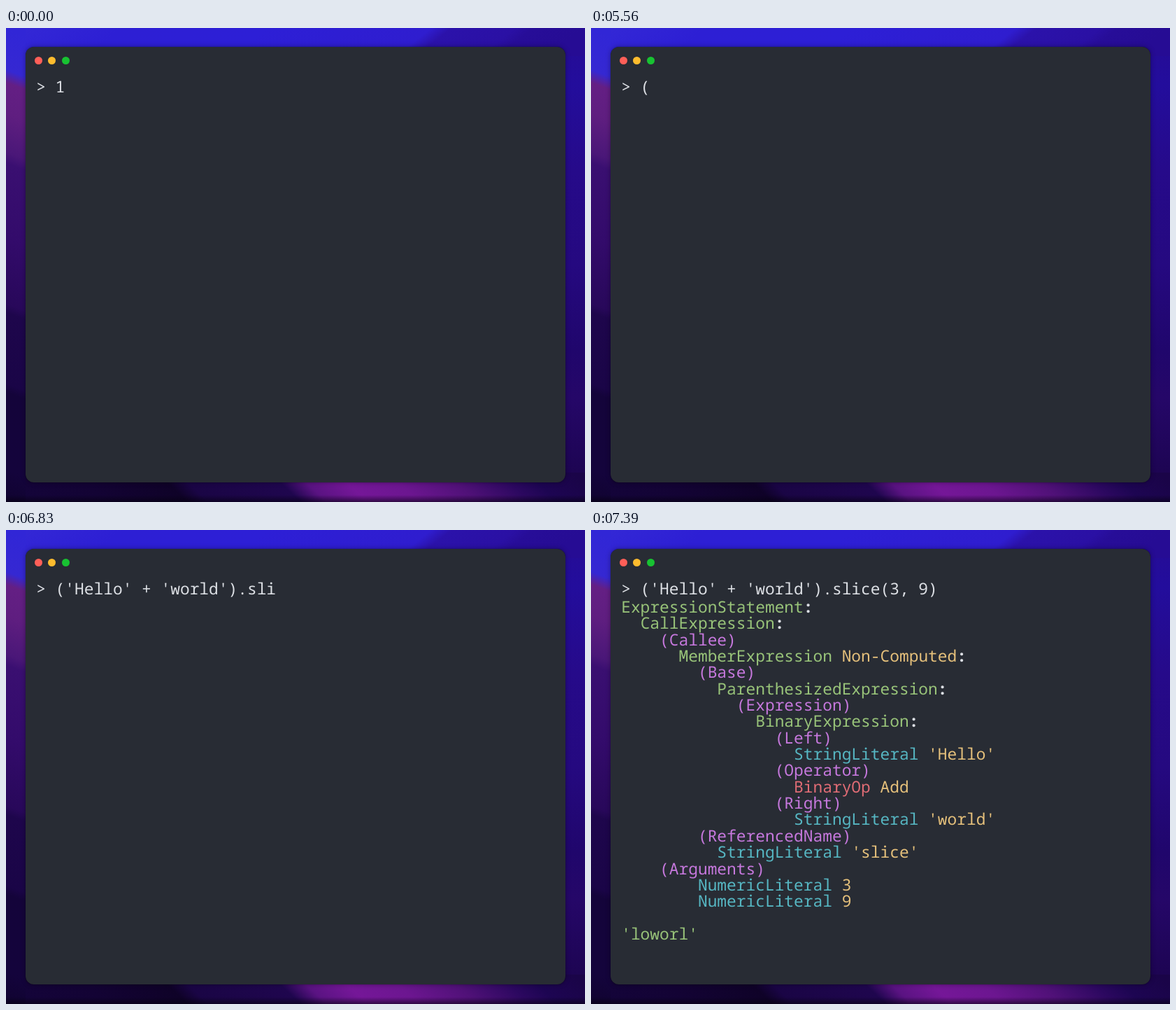
Write an HTML page that moves like this. It is 828x677 px and loops after 8000 ms.

```html
<!DOCTYPE html>
<html lang="en">
<head>
<meta charset="utf-8">
<title>Expression REPL</title>
<style>
  html, body { margin: 0; width: 100%; height: 100%; overflow: hidden; background: #14033a; }
  .stage { position: relative; width: 828px; height: 677px; overflow: hidden; }
  .stage > * { position: absolute; }
  .wall { left: 0; top: 0; }
  .window {
    left: 28px; top: 27px; width: 772px; height: 622px;
    border-radius: 12px; background: #282c34;
    box-shadow: 0 0 1px rgba(0, 0, 0, .6), 0 0 7px rgba(0, 0, 0, .35);
  }
  .dot { top: 41.2px; width: 11px; height: 11px; border-radius: 50%; }

  /* One character is 0.6em wide */
  .scene {
    left: 43.2px; top: 0;
    font: 22.87px/23.35px "Noto Sans Mono", "DejaVu Sans Mono", monospace;
    font-variant-ligatures: none;
    text-rendering: geometricPrecision;
    color: #dcdfe4;
    opacity: 0;
  }
  .scene > * { position: absolute; left: 0; margin: 0; font: inherit; white-space: pre; }
  .prompt { top: 72.4px; overflow: hidden; }
  .tree { top: 98px; }
  b { color: #dcdfe4; }
  .g { color: #98c379; }
  .p { color: #c678dd; }
  .c { color: #56b6c2; }
  .y { color: #e5c07b; }
  .r { color: #e06c75; }

  .scene, .tree { animation: 8s step-end infinite; }
  .prompt { animation: 8s linear infinite; }
  .sum { animation-name: first; }
  .call { animation-name: second; }
  .sum .prompt { animation-name: type-sum; }
  .call .prompt { animation-name: type-call; }
  .sum .tree { animation-name: print-sum; }
  .call .tree { animation-name: print-call; }

  @keyframes first { 0% { opacity: 1 } 69.49%, 100% { opacity: 0 } }
  @keyframes second { 0% { opacity: 0 } 69.49%, 100% { opacity: 1 } }
  @keyframes type-sum {
    0% { width: 1.8em; animation-timing-function: steps(8, end) }
    5.49%, 100% { width: 6.6em }
  }
  @keyframes type-call {
    0%, 69.45% { width: 1.8em; animation-timing-function: steps(30, end) }
    90.24%, 100% { width: 19.8em }
  }
  @keyframes print-sum { 0% { opacity: 0 } 7.62%, 100% { opacity: 1 } }
  @keyframes print-call { 0% { opacity: 0 } 92.37%, 100% { opacity: 1 } }
</style>
</head>
<body>
<div class="stage">
  <svg class="wall" width="828" height="677" viewBox="0 0 828 677">
    <defs>
      <linearGradient id="left" gradientUnits="userSpaceOnUse" x1="0" y1="0" x2="0" y2="677" gradientTransform="skewY(20)">
        <stop offset="0" stop-color="#3126d6"/>
        <stop offset=".088" stop-color="#3528d2"/>
        <stop offset=".115" stop-color="#641f84"/>
        <stop offset=".18" stop-color="#5f1e80"/>
        <stop offset=".262" stop-color="#4a1778"/>
        <stop offset=".285" stop-color="#3a0f71"/>
        <stop offset=".44" stop-color="#330b6b"/>
        <stop offset=".582" stop-color="#28085a"/>
        <stop offset=".6" stop-color="#1e064c"/>
        <stop offset=".75" stop-color="#1a0547"/>
        <stop offset=".768" stop-color="#14043a"/>
        <stop offset=".93" stop-color="#14043c"/>
        <stop offset="1" stop-color="#100330"/>
      </linearGradient>
      <linearGradient id="right" x1="0" y1="0" x2="0" y2="1">
        <stop offset="0" stop-color="#260c94"/>
        <stop offset=".12" stop-color="#230d9c"/>
        <stop offset=".3" stop-color="#260a8a"/>
        <stop offset=".5" stop-color="#250980"/>
        <stop offset=".68" stop-color="#20066c"/>
        <stop offset=".78" stop-color="#250768"/>
        <stop offset=".9" stop-color="#1f0558"/>
        <stop offset="1" stop-color="#1a0448"/>
      </linearGradient>
      <linearGradient id="top" gradientUnits="userSpaceOnUse" x1="0" y1="0" x2="828" y2="0" gradientTransform="skewX(-52)">
        <stop offset="0" stop-color="#3429d6"/>
        <stop offset=".2" stop-color="#2d1fd4"/>
        <stop offset=".45" stop-color="#2d1fd6"/>
        <stop offset=".735" stop-color="#2f1dcf"/>
        <stop offset=".77" stop-color="#2b12aa"/>
        <stop offset=".88" stop-color="#2a10a4"/>
        <stop offset=".91" stop-color="#270d98"/>
        <stop offset="1" stop-color="#260c94"/>
      </linearGradient>
      <linearGradient id="bottom" gradientUnits="userSpaceOnUse" x1="0" y1="0" x2="828" y2="0" gradientTransform="translate(0 650) skewX(46)">
        <stop offset="0" stop-color="#14043a"/>
        <stop offset=".14" stop-color="#130334"/>
        <stop offset=".28" stop-color="#0f0228"/>
        <stop offset=".315" stop-color="#1a0545"/>
        <stop offset=".475" stop-color="#1f064e"/>
        <stop offset=".52" stop-color="#5a1382"/>
        <stop offset=".59" stop-color="#751798"/>
        <stop offset=".68" stop-color="#6c1690"/>
        <stop offset=".78" stop-color="#501178"/>
        <stop offset=".87" stop-color="#2c0860"/>
        <stop offset=".92" stop-color="#1d0552"/>
        <stop offset="1" stop-color="#1a0448"/>
      </linearGradient>
      <linearGradient id="floor" x1="0" y1="0" x2="0" y2="1">
        <stop offset="0" stop-color="#05010f" stop-opacity="0"/>
        <stop offset="1" stop-color="#05010f" stop-opacity=".6"/>
      </linearGradient>
    </defs>
    <rect width="60" height="677" fill="url(#left)"/>
    <rect x="770" width="58" height="677" fill="url(#right)"/>
    <rect x="28" width="800" height="40" fill="url(#top)"/>
    <rect x="28" y="635" width="800" height="42" fill="url(#bottom)"/>
    <rect y="667" width="828" height="10" fill="url(#floor)"/>
  </svg>

  <div class="window"></div>
  <div class="dot" style="left:41.2px;background:#ff5f58"></div>
  <div class="dot" style="left:60.4px;background:#febc2e"></div>
  <div class="dot" style="left:79.6px;background:#18c232"></div>

  <div class="scene sum">
    <div class="prompt">&gt; 1 + 2 * 3</div>
    <pre class="tree">
<span class="g">ExpressionStatement</span><b>:</b>
  <span class="g">BinaryExpression</span><b>:</b>
    <span class="p">(Left)</span>
      <span class="c">NumericLiteral</span> <span class="y">1</span>
    <span class="p">(Operator)</span>
      <span class="r">BinaryOp</span> <span class="y">Add</span>
    <span class="p">(Right)</span>
      <span class="g">BinaryExpression</span><b>:</b>
        <span class="p">(Left)</span>
          <span class="c">NumericLiteral</span> <span class="y">2</span>
        <span class="p">(Operator)</span>
          <span class="r">BinaryOp</span> <span class="y">Multiply</span>
        <span class="p">(Right)</span>
          <span class="c">NumericLiteral</span> <span class="y">3</span>

<span class="y">7</span></pre>
  </div>

  <div class="scene call">
    <div class="prompt">&gt; ('Hello' + 'world').slice(3, 9)</div>
    <pre class="tree">
<span class="g">ExpressionStatement</span><b>:</b>
  <span class="g">CallExpression</span><b>:</b>
    <span class="p">(Callee)</span>
      <span class="g">MemberExpression</span> <span class="y">Non-Computed</span><b>:</b>
        <span class="p">(Base)</span>
          <span class="g">ParenthesizedExpression</span><b>:</b>
            <span class="p">(Expression)</span>
              <span class="g">BinaryExpression</span><b>:</b>
                <span class="p">(Left)</span>
                  <span class="c">StringLiteral</span> <span class="y">'Hello'</span>
                <span class="p">(Operator)</span>
                  <span class="r">BinaryOp</span> <span class="y">Add</span>
                <span class="p">(Right)</span>
                  <span class="c">StringLiteral</span> <span class="y">'world'</span>
        <span class="p">(ReferencedName)</span>
          <span class="c">StringLiteral</span> <span class="y">'slice'</span>
    <span class="p">(Arguments)</span>
        <span class="c">NumericLiteral</span> <span class="y">3</span>
        <span class="c">NumericLiteral</span> <span class="y">9</span>

<span class="g">'loworl'</span></pre>
  </div>
</div>
</body>
</html>
```
